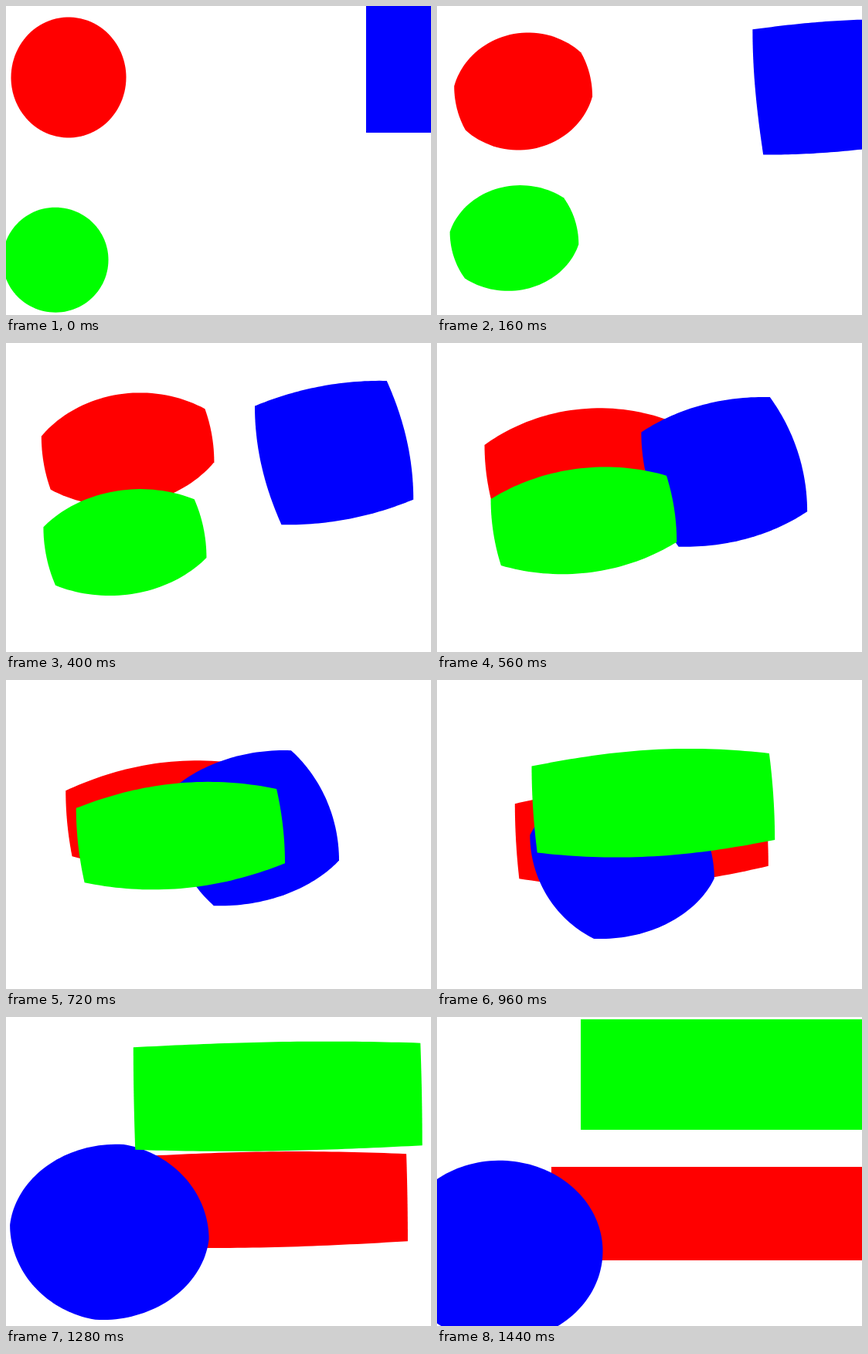
An HTML page with a canvas that plays this animation: 550x400 px, repeating every 1.52 s.

```html
<!DOCTYPE html>
<html lang="en">
<head>
<meta charset="utf-8">
<title>Shape morphs</title>
<style>
  html, body { margin: 0; height: 100%; overflow: hidden; background: #fff; }
  canvas { display: block; }
</style>
</head>
<body>
<canvas id="stage" width="550" height="400"></canvas>
<script>
const ctx = document.getElementById('stage').getContext('2d');
const STEP = 80, STEPS = 19;

// oval: cx, cy, rx, ry; rect: left, top, right, bottom.
// split: angle in degrees that meets the rectangle's top right corner.
const shapes = [
  { color: '#f00', oval: [81, 92.5, 74.5, 78], rect: [148, 194, 565.5, 315], split: 39 },
  { color: '#00f', oval: [81, 303.2, 133.5, 117.4], rect: [466, -3.8, 647.5, 164], split: 86, toOval: true },
  { color: '#0f0', oval: [64, 328.7, 68.5, 68], rect: [186, 3, 589.5, 146], split: 47 }
];

const mix = (a, b, t) => a + (b - a) * t;

function drawShape({ color, oval, rect, split, toOval }, progress) {
  const [cx, cy, rx, ry] = oval;
  const [left, top, right, bottom] = rect;
  const corners = [[left, top], [right, top], [right, bottom], [left, bottom]];
  const angles = [180, 360 - split, 360, 540 - split, 540];
  const t = toOval ? 1 - progress : progress;
  const points = 40;

  ctx.beginPath();
  for (let side = 0; side < 4; side++) {
    const from = corners[side], to = corners[(side + 1) % 4];
    for (let i = 0; i < points; i++) {
      const u = i / points;
      const angle = mix(angles[side], angles[side + 1], u) * Math.PI / 180;
      ctx.lineTo(
        mix(cx + rx * Math.cos(angle), mix(from[0], to[0], u), t),
        mix(cy + ry * Math.sin(angle), mix(from[1], to[1], u), t)
      );
    }
  }
  ctx.fillStyle = color;
  ctx.fill();
}

function render() {
  const step = Math.floor(performance.now() / STEP) % STEPS;
  ctx.fillStyle = '#fff';
  ctx.fillRect(0, 0, 550, 400);
  for (const shape of shapes) drawShape(shape, step / (STEPS - 1));
  requestAnimationFrame(render);
}
render();
</script>
</body>
</html>
```
